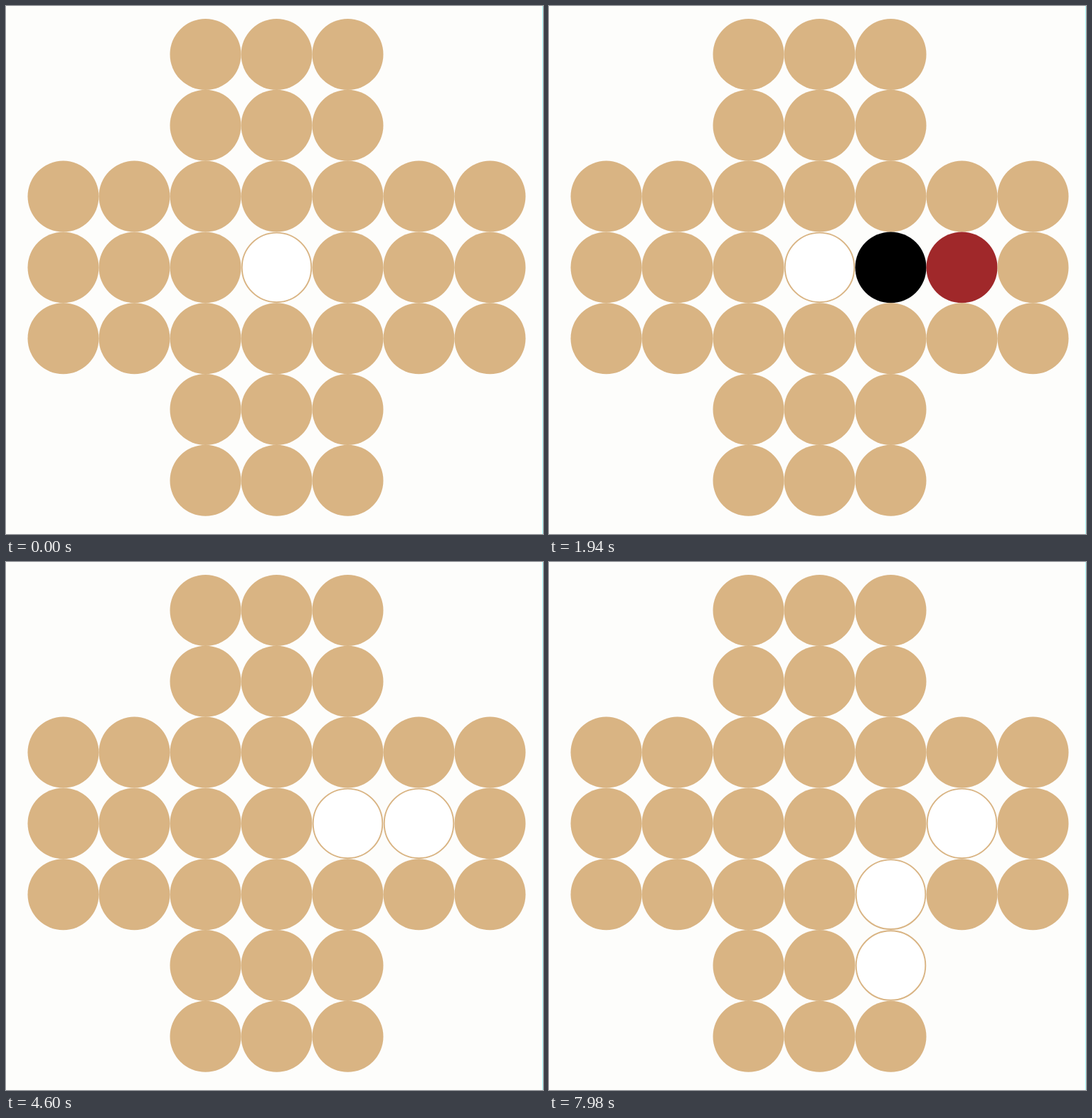
Recreate the animation shown at these times as an HTML page with a canvas. Size 755 by 742 pixels, loop 8 s.

```html
<!DOCTYPE html>
<html lang="en">
<head>
<meta charset="utf-8">
<title>Peg solitaire</title>
<style>
  html, body { margin: 0; width: 100%; height: 100%; overflow: hidden; background: #fdfdfb; }
  canvas { display: block; }
</style>
</head>
<body>
<canvas id="board" width="755" height="742"></canvas>
<script>
const ctx = document.getElementById('board').getContext('2d');
const LOOP = 8000;
const WOOD = '#d9b483', JUMPED = '#000', MOVING = '#a0282a';

// Cells are [column, row]; each move is highlighted first, then carried out.
const moves = [
  { from: [5, 3], over: [4, 3], to: [3, 3], show: 840, jump: 3340 },
  { from: [4, 5], over: [4, 4], to: [4, 3], show: 5020, jump: 7540 }
];

const onBoard = (col, row) => Math.abs(col - 3) < 2 || Math.abs(row - 3) < 2;

function boardAt(time) {
  const colors = new Map();
  const set = (cell, color) => colors.set(String(cell), color);
  for (let row = 0; row < 7; row++)
    for (let col = 0; col < 7; col++)
      if (onBoard(col, row)) set([col, row], WOOD);
  set([3, 3], null);

  for (const { from, over, to, show, jump } of moves) {
    if (time >= jump) {
      set(from, null);
      set(over, null);
      set(to, WOOD);
    } else if (time >= show) {
      set(from, MOVING);
      set(over, JUMPED);
    }
  }
  return colors;
}

function drawCell(col, row, color) {
  ctx.beginPath();
  ctx.arc(80.5 + 100 * col, 68 + 99.8 * row, color ? 50 : 48.8, 0, 2 * Math.PI);
  ctx.fillStyle = color || '#fff';
  ctx.fill();
  if (!color) {
    ctx.strokeStyle = WOOD;
    ctx.lineWidth = 1.9;
    ctx.stroke();
  }
}

function draw(now) {
  ctx.fillStyle = '#fdfdfb';
  ctx.fillRect(0, 0, 755, 742);
  ctx.fillStyle = '#a8fbfb';
  ctx.fillRect(754, 0, 1, 742);
  for (const [cell, color] of boardAt(now % LOOP)) {
    const [col, row] = cell.split(',').map(Number);
    drawCell(col, row, color);
  }
}

const start = performance.now();
function tick() {
  draw(performance.now() - start);
  requestAnimationFrame(tick);
}
tick();
</script>
</body>
</html>
```
